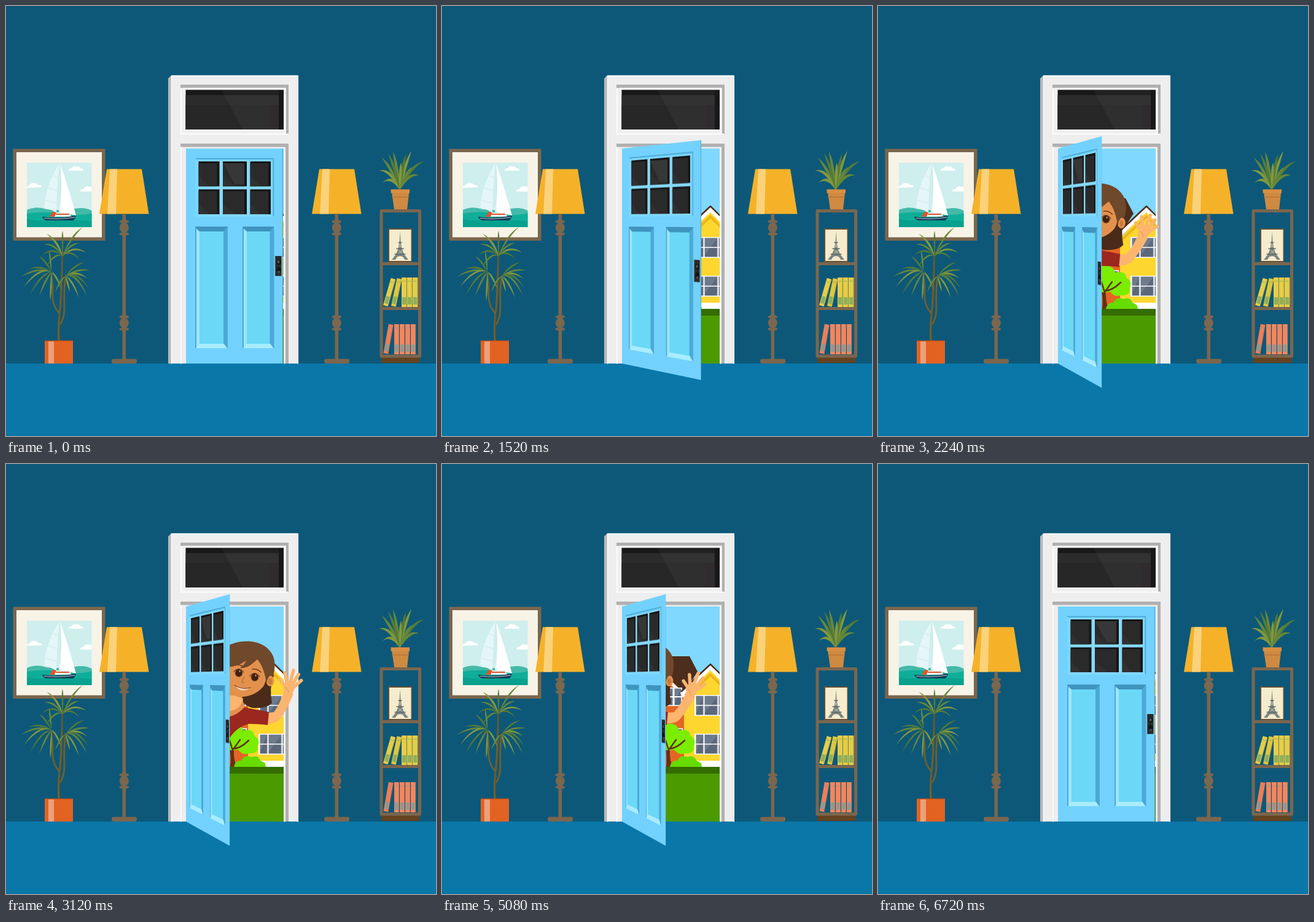
These frames come from a looping animation (700 by 700 pixels, 7.68 s). An HTML page:

```html
<!DOCTYPE html>
<html lang="en">
<head>
<meta charset="utf-8">
<title>Door</title>
<style>
html, body { margin: 0; width: 100%; height: 100%; overflow: hidden; background: #0d5879; }
#stage { position: relative; width: 700px; height: 700px; overflow: hidden; perspective: 972px; perspective-origin: 350px 350px; }
svg { position: absolute; left: 0; top: 0; width: 700px; height: 700px; }
#door { transform-origin: 293px 350px; }
</style>
</head>
<body>
<div id="stage"><svg id="room" viewBox="0 0 700 700"></svg><svg id="door" viewBox="0 0 700 700"></svg></div>
<script>
const rect = (x, y, w, h, fill, more = '') => `<rect x="${x}" y="${y}" width="${w}" height="${h}" fill="${fill}" ${more}/>`;
const shape = (d, fill, more = '') => `<path d="${d}" fill="${fill}" ${more}/>`;
const oval = (x, y, rx, ry, fill) => `<ellipse cx="${x}" cy="${y}" rx="${rx}" ry="${ry}" fill="${fill}"/>`;
const line = (d, color, w = 1) => `<path d="${d}" fill="none" stroke="${color}" stroke-width="${w}" stroke-linecap="round" stroke-linejoin="round"/>`;
const group = (attrs, ...parts) => `<g ${attrs}>${parts.join('')}</g>`;
const brown = '#7b664e';
const greens = ['#66873a', '#80983f', '#557a35'];

// A fan of tapered leaves that rise first and then bend outwards; each tip is [x, y, lift]
const leaves = (x, y, w, tips) => tips.map(([tx, ty, lift], i) => {
  const dx = tx - x, dy = ty - y, len = Math.hypot(dx, dy);
  const cx = x + dx * .45, cy = y + dy * .68 - lift;
  const nx = -dy / len * w, ny = dx / len * w;
  return shape(`M${x} ${y}Q${cx + nx} ${cy + ny} ${tx} ${ty}Q${cx - nx} ${cy - ny} ${x} ${y}`, greens[i % 3]);
}).join('');

const picture = () => group('',
  rect(11.5, 232.5, 150, 149.5, brown), rect(17, 238, 139, 138.5, '#f8f3e7'), rect(34, 255, 105.5, 105, '#cfeeee'),
  shape('M34 296q0-4 4-4q2-4 7-4q5 0 7 3q6 0 7 4zM102 268q0-4 5-4q3-5 8-3q5 0 6 3q5 0 5 4zM121 302q0-4 5-4q3-6 10-4l3.500 0v8z', '#fff'),
  shape('M34 332Q50 325 66 331Q95 334 112 330Q128 327 139.500 333V360H34z', '#43b9a9'),
  shape('M34 338Q60 333 90 338T139.500 337V360H34z', '#0eae99'),
  shape('M34 347q20 4 42 2t63 1v10H34z', '#08a08e'),
  shape('M87 256Q64 292 62 328Q74 331 82 337Q83 290 87 256', '#e4f6f7'),
  shape('M88 256Q103 300 114 341L86 335Q93 300 88 256', '#fff'),
  line('M76 276l10 4M68 296l16 5M64 316l19 5M88 258v82', '#cfe6e8', .8),
  shape('M73 343l4-7h25l5 7z', '#eef2f0'), shape('M71 343l5-8 6 1-3 7z', '#e2532b'),
  line('M82 339h20', '#d65a35', 2), shape('M59 343Q85 347 114 341Q113 347 109 349H65Q60 347 59 343', '#143b57'),
  line('M62 345.500Q85 348 112 344', '#e8eef0', .8));

const tallPlant = () => group('',
  line('M86 546Q84 520 88 494Q91 450 92 400M87 520Q95 510 95 490Q94 460 97 440M87 500Q74 488 76 462L74 436', '#6f6032', 2.8),
  line('M88 545Q86 515 90 490Q93 450 92 404', '#5b5029', 1.2),
  leaves(92, 407, 2.8, [[125, 360, 2], [66, 371, 4], [92, 366, 0], [119, 386, 6], [130, 401, 14], [59, 405, 14], [62, 388, 8], [77, 379, 0], [120, 413, 16], [66, 424, 18]]),
  leaves(74, 433, 2.8, [[24, 441, 14], [29, 458, 26], [39, 470, 24], [54, 472, 16], [72, 480, 4], [37, 428, 8], [70, 398, 0], [90, 460, 14], [54, 407, 0]]),
  leaves(97, 440, 2.8, [[136, 430, 6], [133, 444, 14], [134, 459, 24], [132, 472, 30], [119, 475, 20], [127, 417, 2], [80, 466, 14], [104, 466, 8]]),
  rect(63, 545, 46, 37, '#e26321'), rect(69, 545, 9, 37, '#ee9f7b'), rect(63, 544.500, 46, 1.500, '#c8531a'));

const lamp = x => group(`transform="translate(${x})"`,
  shape('M164 265.500H221L232.500 338.500H152z', '#f5b229'), shape('M169 265.500H181L179 338.500H165z', '#fad27a'),
  rect(189.500, 338.500, 5.600, 238, brown),
  ...[361, 516].map(y => oval(192.300, y - 10, 8, 3, brown) + oval(192.300, y, 7.500, 8.500, brown) + oval(192.300, y + 10, 8, 3, brown)),
  rect(172, 574.500, 41, 7.500, brown, 'rx="3"'));

const book = (x, y, h, w, color, label, tilt = 0) => group(`transform="translate(${x} ${y}) rotate(${tilt})"`,
  rect(0, -h, w, h, color), rect(w - 1, -h, 1, h, '#0002'), rect(1, -16, w - 2.500, 12, label), line(`M1.500 ${6 - h}h${w - 4}`, label));

const shelf = () => group('',
  rect(611, 571, 62, 10, '#644321'), line('M611 333.500H673.500V570H611zM611 419.500H673M611 492.500H673', brown, 5),
  rect(622, 362, 39, 55, '#675137'), rect(624, 364, 35.500, 51, '#f4eccd'),
  shape('M641.500 367l1 17 2 11 3.500 9 7 9h-6q-2-6-7.500-6t-7.500 6h-6l7-9 3.500-9 2-11z', '#7b8583'),
  line('M636 395h11M633 404h17M639 385h5', '#59676a', 1.500), line('M639 398l6 5m-6 0l6-5m-5-10l3 5m-3 0l3-5', '#f4eccd', .6),
  book(614, 487, 46, 8, '#e5cd49', '#8db05c', 16), book(627, 488, 46, 8, '#dfc63f', '#8db05c', 12),
  ...[644, 653, 662].map(x => book(x, 490, 48, 8.500, '#e5cd49', '#8db05c')),
  book(614.500, 565, 48, 8, '#ee7e58', '#8d9994', 10),
  ...[632, 641, 650, 659].map(x => book(x, 567, 49, 8, '#f2865f', '#8d9994')),
  leaves(641, 300, 4.5, [[630, 237, 0], [660, 236, 0], [681, 253, 10], [612, 247, 0], [607, 268, 14], [651, 241, 0], [673, 276, 14], [613, 288, 18], [622, 240, 0], [662, 262, 4], [643, 255, 0]]),
  shape('M628 304h28l-3 27h-21z', '#cf8a41'), rect(626.500, 298.500, 30.500, 6, '#d88f43'),
  line('M629 311h26', '#b97635', 1.500));

const panes = (x, y, w, h) => rect(x, y, w, h, '#fff') + rect(x + 1.500, y + 1.500, w - 3, h - 3, '#6d7b8d') +
  shape(`M${x + 2} ${y + h - 5}l${w - 5}-${h - 9}v${h - 6}h-${w - 5}z`, '#5c6879');

const outside = () => group('clip-path="url(#opening)"',
  rect(290, 232, 164, 270, '#80d8ff'),
  rect(290, 355, 106, 138, '#e56524'), shape('M340 313H403L416 338L394 372L366 346H340z', '#4d2d1c'),
  shape('M340 372L366 346L397 377V384L366 353L340 378z', '#fff'),
  panes(362, 364, 15, 30), panes(377, 364, 14, 30), line('M362 379h29', '#fff', 2), panes(368, 430, 24, 30),
  shape('M394 378L437 331L470 366V493H394z', '#fdd62f'),
  shape('M394 380L437 340L470 373V378L437 346L394 386z', '#e9b71c'),
  line('M392 373L437 331L475 369', '#fff', 7), line('M390 370L437 326L477 365', '#4d2d1c', 2.500),
  ...[376, 439].map(y => rect(411, y, 44, 34, '#fff') + [[413, 12], [427, 21], [450, 9]].map(([x, w]) => panes(x - 1, y, w + 3, 34)).join('') + line(`M412 ${y + 17}H453`, '#fff', 1.500)),
  rect(393, 483, 62, 10, '#fff'),
  shape('M365 493q2-15-1-29h7q-1 15 4 29z', '#632f14'),
  shape('M350 440q-2-17 20-17q12-2 16 11q17-4 18 8q12 8 5 17q4 13-14 12q-10 4-17-6q-22 5-28-10z', '#7bed00'),
  line('M369 482V464Q382 463 395 450M371 463L381 449M369 466L364 450', '#632f14', 2.500),
  shape('M371 493q3-12 12-10q5-11 17-6q11-4 14 6q9 2 9 10z', '#66dc00'),
  rect(290, 493, 164, 90, '#4b9a00'), rect(290, 493, 164, 11, '#356d00'));

const frame = () => group('',
  shape('M264 118L269 113V582H264z', '#b9b9bb'),
  shape('M269 113H476V582H452V232H293V582H269z', '#eee'),
  line('M269.500 582V113.500H475V582', '#fff', 1.500),
  rect(284, 128, 176, 81, '#f0f0f0'), shape('M284 128H460V209H455V133.500H284z', '#b0b0b0'),
  line('M285 134V208.500H459M289 134H455V208', '#fff', 1.500),
  rect(292.500, 136.500, 159.500, 64.500, '#181818'), rect(292.500, 145, 151.500, 56, '#2c2b2c'),
  rect(292.500, 161, 136, 40, '#282728'), rect(428, 161, 16, 40, '#302b2e'),
  shape('M351 136.500H444V161H428V201H385z', '#fff', 'opacity=".035"'),
  shape('M284 224H460V582H455V229.500H284z', '#b0b0b0'),
  line('M285 230V582M453.500 232V582', '#fff', 1.500));

const arm = () => group('id="arm"',
  shape('M424 405L437 404Q448 390 455 369L470 376Q460 398 447 415Q440 423 424 423z', '#fbb56f'),
  line('M460 366L449 352M461 364L458 341M464 363L472 338M467 364L480 345M468 368L484 355', '#fbb56f', 5.500),
  oval(463, 366, 9, 11, '#fbb56f'), line('M457 365Q461 367 463 374', '#e89a55', 1.200));

const eye = (x, y) => oval(x, y, 6.500, 7, '#9a5a2c') + oval(x, y, 5.500, 6, '#3f2012') + oval(x + 1.500, y - 2.500, 1.200, 1.400, '#c99a70') +
  line(`M${x - 8} ${y - 2}Q${x} ${y - 11} ${x + 8} ${y - 1}`, '#6a3a1c', 1.200);

const girl = () => group('clip-path="url(#visible)"', group('id="girl"',
  shape('M345 330Q350 300 400 300L436 344Q428 365 433 389Q424 399 401 397Q394 396 386 388L350 380z', '#4a2b1a'),
  shape('M355 370H384Q384 390 392 398L380 412H355z', '#e2914d'),
  shape('M350 412Q372 414 388 396L428 404L426 424L395 423Q376 428 364 446V500H345z', '#9b271f'),
  shape('M364 402Q382 400 386 382L372 377H358z', '#fbb56f'),
  arm(), shape('M410 400L428 404L426 425L404 422z', '#9b271f'),
  oval(430, 353, 6.500, 9, '#e2914d'), oval(430, 354, 3, 5, '#c87838'),
  shape('M350 315Q390 300 420 326Q428 346 419 362Q405 379 381 379Q358 376 350 345z', '#e2914d'),
  eye(379, 340), eye(405, 347),
  line('M370 328Q377 325 385 329M401 334Q409 333 415 339', '#6a3a1c', 1.500),
  line('M388 347Q381 354 387 357', '#bd6b31', 1.300),
  shape('M373 360Q384 367 397 364Q390 370 382 368Q376 366 373 360', '#f6ddc4'),
  line('M372 360Q384 368 398 364', '#8e3b20', 1.200),
  shape('M348 329V306Q364 288 396 288.500Q425 291 435 313Q440 326 435 345Q427 341 424 357Q420 330 409 318Q393 334 381 332Q388 327 391 320Q372 334 348 329', '#70482b')));

const doorPanel = (x, w) => rect(x, 359, w, 198, '#4ba9d5') +
  shape(`M${x} 359h${w}l-7 8h-${w - 14}z`, '#3f94be') +
  shape(`M${x + 2} 363l5 4v183l-5 6z`, '#9fe5fc') +
  shape(`M${x + 1} 557h${w - 2}l-6-8h-${w - 14}z`, '#a9ecfe') +
  rect(x + 7, 367, w - 14, 183, '#6bd8f8');

const pane = (x, y, w, h) => rect(x, y, w, h, '#151515') + rect(x, y + 3, w - 4, h - 3, '#2b2a2b') +
  shape(`M${x} ${y + h}v-${h * .45}l${w * .5} ${h * .45}z`, '#fff', 'opacity=".03"');

const doorLeaf = () => [
  rect(293, 232, 158, 350, '#73d2fd'), rect(450, 232, 1, 350, '#4aa3cf'),
  line('M309 248.500H435.500V342', '#45a0cb', 1.300), line('M309.500 250V342H434', '#8cdfff', 1),
  rect(312, 251.500, 120.500, 89, '#86dafb'),
  ...[[313.500, 34], [353, 39], [397.500, 33.500]].map(([x, w]) => pane(x, 253, w, 40.500) + pane(x, 298.500, w, 40.500)),
  shape('M354 256h34v34h-16z', '#fff', 'opacity=".06"'),
  doorPanel(308, 53), doorPanel(385, 51.500),
  rect(438, 407, 10.500, 32.500, '#2b292a'), line('M438.500 408V439', '#555', .8),
  oval(444, 417, 3.500, 4, '#111'), oval(443.500, 416.500, 2, 2.500, '#555'), oval(444, 430, 3.500, 5, '#131313'), oval(444, 433, 2.500, 2, '#494949')
].join('');

const find = id => document.getElementById(id);
find('room').innerHTML = `<defs><clipPath id="opening"><rect x="293" y="232" width="159" height="350"/></clipPath>
  <clipPath id="visible"><rect x="293" y="200" width="407" height="382"/></clipPath></defs>` +
  rect(0, 0, 700, 700, '#0d5879') + rect(0, 582, 700, 118, '#0a77a9') +
  picture() + tallPlant() + lamp(0) + lamp(346) + shelf() + outside() + frame() + girl();
find('door').innerHTML = doorLeaf();

// Keyframes are [time, value] pairs with an ease in and out between them
const tween = (keys, t) => {
  if (t <= keys[0][0]) return keys[0][1];
  const i = keys.findIndex(k => t < k[0]);
  if (i < 0) return keys[keys.length - 1][1];
  const [t0, a] = keys[i - 1], [t1, b] = keys[i], p = (t - t0) / (t1 - t0);
  return a + (b - a) * p * p * (3 - 2 * p);
};
const swing = [[940, 0], [1940, 64], [5718, 64], [6718, 0]];
const lean = [[1532, -165], [2532, 0], [4790, 0], [5450, -146]];
const wave = [[2880, 4], [3380, -11], [3880, 22], [4380, 4]];

function draw() {
  const t = performance.now() % 7680;
  find('door').style.transform = `rotateY(${-tween(swing, t)}deg)`;
  find('girl').setAttribute('transform', `translate(${tween(lean, t)})`);
  find('girl').setAttribute('visibility', t < 1532 ? 'hidden' : 'visible');
  find('arm').setAttribute('transform', `rotate(${tween(wave, t)} 433 413)`);
  requestAnimationFrame(draw);
}
draw();
</script>
</body>
</html>
```
